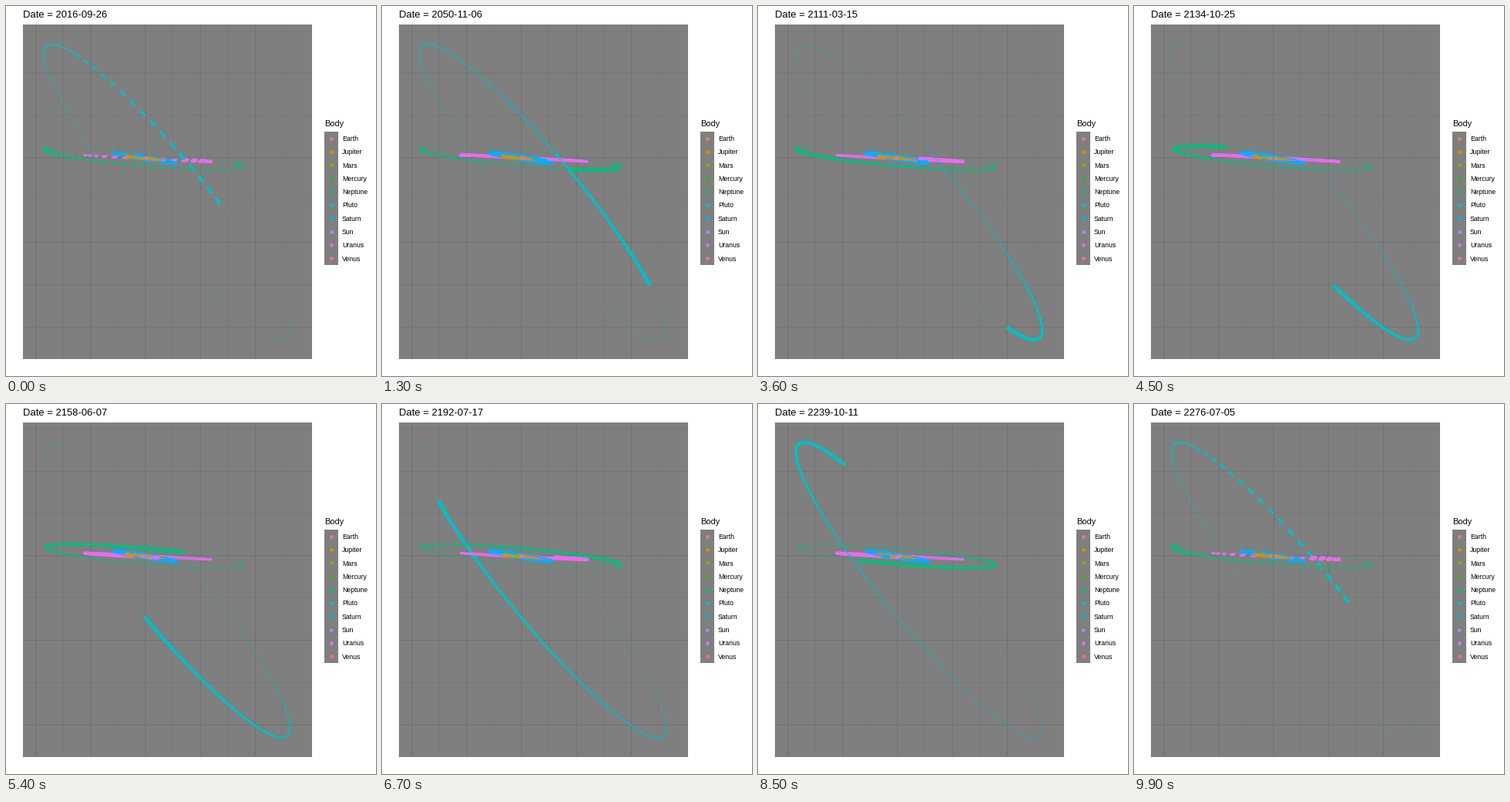
A matplotlib script for the animation above (10 s loop, 480x480 px).

```python
import numpy as np
import matplotlib.pyplot as plt
from matplotlib.animation import FuncAnimation
from matplotlib.patches import Rectangle

plt.rcParams["font.family"] = "Liberation Sans"

FRAMES, STEP, STEPS = 100, 160, 593
START = np.datetime64("2016-09-26")
CX, CY = 180.3, 197.5      # position of the Sun
SX, SZ = 4.275, 16.54      # pixels per AU

# Radius, eccentricity, then angles: inclination, longitude, perihelion, node.
# The inner bodies stay so close to the centre that plain circles do.
ORBITS = {
    "Sun": (0.01,),
    "Mercury": (0.39,),
    "Venus": (0.72,),
    "Earth": (1.0,),
    "Mars": (1.52,),
    "Jupiter": (5.2016, 0.048, 1.30, 34.4, 14.7, 100.5),
    "Saturn": (9.537, 0.054, 2.49, 50.0, 92.6, 113.7),
    "Uranus": (19.189, 0.047, 0.77, 313.2, 171.0, 74.0),
    "Neptune": (30.07, 0.009, 1.77, 304.9, 45.0, 131.8),
    "Pluto": (39.5, 0.2488, 17.14, 240.7, 224.07, 110.3),
}


def hcl(hue, chroma=100, lum=65):
    """Polar LUV colour as sRGB."""
    h = np.radians(hue)
    y = ((lum + 16) / 116) ** 3
    u = chroma * np.cos(h) / (13 * lum) + 0.1978
    v = chroma * np.sin(h) / (13 * lum) + 0.4683
    x = 9 * y * u / (4 * v)
    z = 3 * y / v - x / 3 - 5 * y
    rgb = np.array([3.2405 * x - 1.5372 * y - 0.4985 * z,
                    -0.9693 * x + 1.8760 * y + 0.0416 * z,
                    0.0556 * x - 0.2040 * y + 1.0573 * z])
    rgb = np.clip(rgb, 0, 1)
    rgb = np.where(rgb > 0.0031, 1.055 * rgb ** (1 / 2.4) - 0.055, 12.92 * rgb)
    return np.clip(rgb, 0, 1)


COLORS = {body: hcl(15 + 36 * i) for i, body in enumerate(sorted(ORBITS))}


def locate(cent, a, e=0, inc=0, lon=0, peri=0, node=0):
    """Ecliptic x and z of a body in pixels, by Kepler's laws."""
    inc, lon, peri, node = np.radians([inc, lon, peri, node])
    m = lon - peri + 200 * np.pi * cent / a ** 1.5
    ea = m + e * np.sin(m)
    for _ in range(8):
        ea -= (ea - e * np.sin(ea) - m) / (1 - e * np.cos(ea))
    p = a * (np.cos(ea) - e)
    q = a * np.sqrt(1 - e * e) * np.sin(ea)
    w = peri - node
    u = p * np.cos(w) - q * np.sin(w)
    v = p * np.sin(w) + q * np.cos(w)
    x = u * np.cos(node) - v * np.sin(node) * np.cos(inc)
    z = v * np.sin(inc)
    return np.column_stack([CX + SX * x, CY - SZ * z])


# Observations every STEP days, binned to the nearest frame
idx = np.arange(STEPS + 1)
cent = (idx * STEP + 6112.5) / 36525
home = np.round(idx * (FRAMES - 1) / STEPS).astype(int)
rank = idx - np.searchsorted(home, home)

n = len(ORBITS)
points = np.stack([locate(cent, *o) for o in ORBITS.values()], 1).reshape(-1, 2)
home, rank = np.repeat(home, n), np.repeat(rank, n)
rgba = np.tile([[*COLORS[b], 1] for b in ORBITS], (STEPS + 1, 1))

fig = plt.figure(figsize=(480 / 72, 480 / 72), dpi=72, facecolor="white")
ax = fig.add_axes([0, 0, 1, 1])
ax.set(xlim=(0, 480), ylim=(480, 0))
ax.axis("off")


def box(x, y, w, h):
    ax.add_patch(Rectangle((x, y), w, h, fc="#7F7F7F", lw=0, zorder=0))


def rules(x0, y0, width):
    style = dict(color="#6B6B6B", lw=width, zorder=1, snap=False,
                 solid_capstyle="butt")
    for x in x0 + 71 * np.arange(5):
        ax.plot([x, x], [24, 458], **style)
    for y in y0 + 109.7 * np.arange(4):
        ax.plot([22, 397], [y, y], **style)


box(22, 24, 375, 434)
rules(39.1, 87.1, 0.7)
rules(74.6, 32.2, 0.35)

# Legend
ax.text(413, 156, "Body", fontsize=11)
box(413, 163, 18, 173)
for i, (body, color) in enumerate(COLORS.items()):
    y = 171.8 + 17.28 * i
    ax.scatter(422, y, s=4.8 ** 2, color=color, lw=0, zorder=2)
    ax.text(436, y + 3.2, body, fontsize=8.7)

title = ax.text(22, 15, "", fontsize=13)
trail = ax.scatter(points[:, 0], points[:, 1], s=np.full(len(points), 4.0),
                   c=rgba, lw=0, zorder=3)


def draw(k):
    age = (k - home) % FRAMES
    # The wake stacks from young to old, with the present on top
    order = np.argsort(np.where(age == 0, FRAMES, age), kind="stable")
    # Only as many observations per bin as the present bin holds
    order = order[rank[order] <= rank[home == k].max()]
    fade = (1 - age[order] / FRAMES) ** 3
    colors = rgba[order]
    colors[:, 3] = 0.5 + 0.5 * np.minimum(1, 1.6 * fade)
    trail.set_offsets(points[order])
    trail.set_sizes((0.8 + 4.1 * fade ** 1.15) ** 2)
    trail.set_facecolors(colors)
    day = int(round(k * STEP * STEPS / (FRAMES - 1)))
    title.set_text(f"Date = {START + day}")
    return trail, title


anim = FuncAnimation(fig, draw, frames=FRAMES, interval=100, repeat=True,
                     repeat_delay=0)
plt.show()
```
